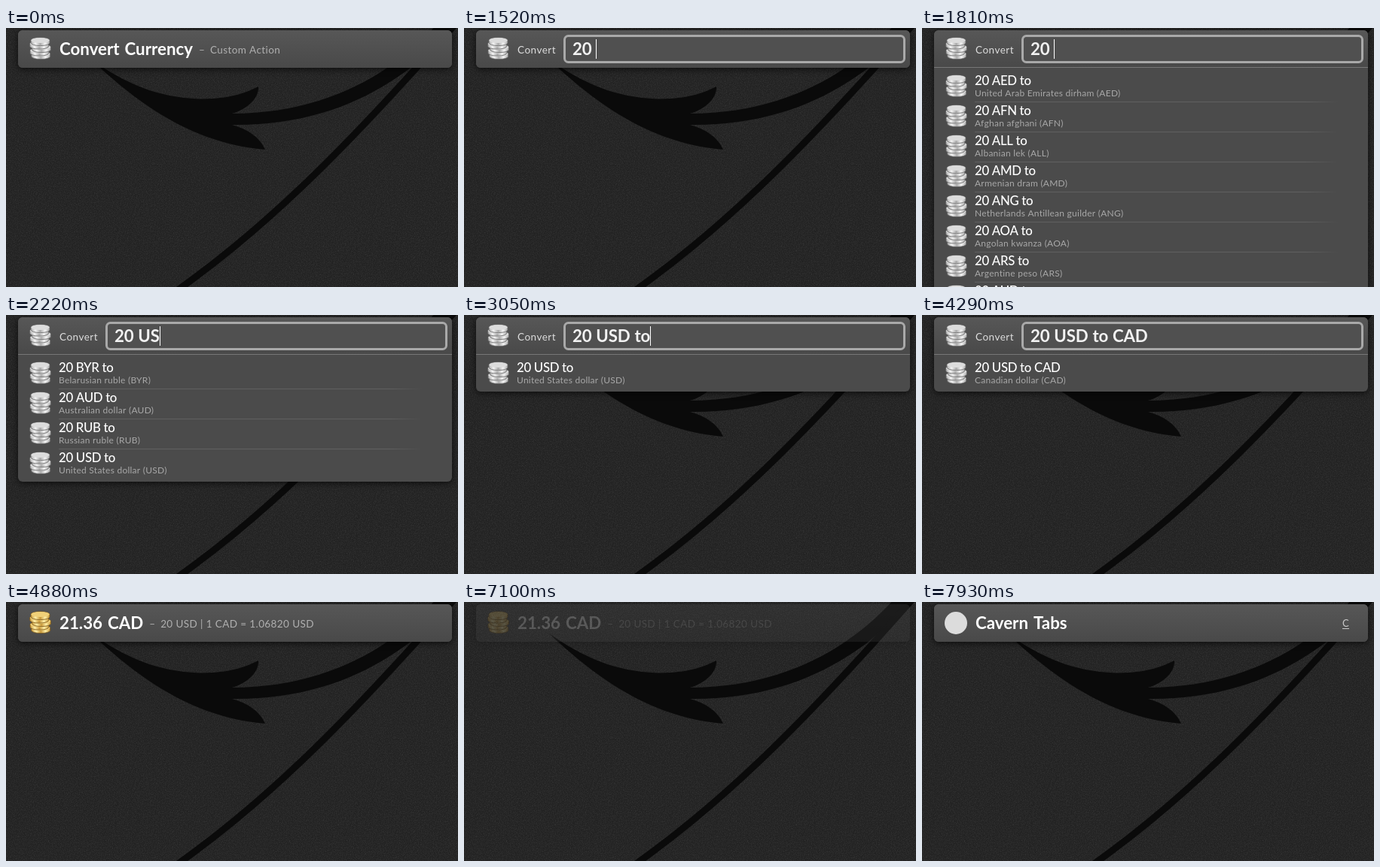
An HTML page with a canvas that plays this animation: 600x345 px, repeating every 7.99 s.

```html
<!DOCTYPE html>
<html lang="en">
<head>
<meta charset="utf-8">
<title>Currency conversion</title>
<style>
html, body { margin: 0; width: 100%; height: 100%; overflow: hidden; background: #272727; }
svg, canvas { position: absolute; left: 0; top: 0; width: 600px; height: 345px; }
</style>
</head>
<body>
<svg viewBox="0 0 600 345">
  <filter id="grain" x="0" y="0" width="100%" height="100%">
    <feTurbulence type="fractalNoise" baseFrequency="0.8" numOctaves="2" seed="4"/>
    <feColorMatrix values="0 0 0 0 1  0 0 0 0 1  0 0 0 0 1  .16 0 0 0 -.06"/>
  </filter>
  <rect width="600" height="345" fill="#222"/>
  <rect width="600" height="345" filter="url(#grain)"/>
  <path fill="#0a0a0a" d="M113 42C160 75 205 94 262 94.500C295 94 315 88 335 78C336 92 323 107 300 114C385 114 455 88 506 53C535 33 553 16 570 -3H600L537 53C475 100 400 130 300 129C322 135 338 147 344 162C270 155 200 125 113 42Z"/>
  <path fill="none" stroke="#0a0a0a" stroke-width="9" d="M228 349C350 262 450 158 543 55L600 -9"/>
</svg>
<canvas id="panel" width="600" height="345"></canvas>
<script>
const LOOP = 7990;
const canvas = document.getElementById('panel');
const ctx = canvas.getContext('2d');

const NAMES = {
  AED: 'United Arab Emirates dirham', AFN: 'Afghan afghani', ALL: 'Albanian lek',
  AMD: 'Armenian dram', ANG: 'Netherlands Antillean guilder', AOA: 'Angolan kwanza',
  ARS: 'Argentine peso', AUD: 'Australian dollar',
  BYR: 'Belarusian ruble', RUB: 'Russian ruble', USD: 'United States dollar',
  EUR: 'Euro', CUP: 'Cuban peso', UAH: 'Ukrainian hryvnia', UYU: 'Uruguayan peso',
  NIO: 'Nicaraguan cordoba', XAF: 'Central African CFA franc', XCD: 'East Caribbean dollar',
  KYD: 'Cayman Islands dollar', MOP: 'Macanese pataca', CRC: 'Costa Rican colon',
  MAD: 'Moroccan dirham', MXN: 'Mexican peso', CAD: 'Canadian dollar'
};
const ALL = 'AED AFN ALL AMD ANG AOA ARS AUD';
const WITH_U = 'BYR AUD RUB USD EUR CUP UAH UYU';
const WITH_C = 'XAF XCD NIO KYD MOP CRC MAD MXN';
const WITH_CA = 'NIO XAF XCD KYD MOP CRC MAD MXN';

const input = (query, codes = '', caret = true) => () => {
  const rows = codes ? codes.split(' ') : [];
  drawBar(rows.length);
  drawInput(query, caret);
  drawRows(rows, query);
};
const title = (name, note, icon) => () => {
  drawBar(0);
  icon();
  drawTitle(name, note);
};
const converted = title('21.36 CAD', '20 USD | 1 CAD = 1.06820 USD', () => drawCoins(0, true));
const blank = () => drawBar(0);

// start time, scene, opacity
const SCENES = [
  [0, title('Convert Currency', 'Custom Action', () => drawCoins(0))],
  [500, input('')],
  [1100, input('2')],
  [1340, input('20')],
  [1520, input('20 ')],
  [1580, input('20 ', ALL)],
  [1860, input('20 U', ALL)],
  [1920, input('20 U', WITH_U)],
  [2220, input('20 US', 'BYR AUD RUB USD')],
  [2400, input('20 USD', 'USD')],
  [2820, input('20 USD ', 'USD')],
  [2880, input('20 USD t', 'USD')],
  [2990, input('20 USD to', 'USD')],
  [3230, input('20 USD to ', ALL)],
  [3400, input('20 USD to C', ALL)],
  [3460, input('20 USD to C', WITH_C)],
  [3630, input('20 USD to CA', WITH_C)],
  [3690, input('20 USD to CA', WITH_CA)],
  [3750, input('20 USD to CAD', 'CAD')],
  [4290, input('20 USD to CAD', 'CAD', false)],
  [4830, () => {
    ctx.globalAlpha = 0.4;
    drawBar(1);
    drawRows(['CAD'], '20 USD to CAD');
    ctx.globalAlpha = 1;
    converted();
  }],
  [4880, converted],
  [7100, converted, 0.23],
  [7160, blank, 0],
  [7580, blank, 0.5],
  [7630, blank],
  [7930, () => {
    title('Cavern Tabs', '', drawDisc)();
    text('C', 558, 33, 13, 400, '#c8c8c8');
    ctx.fillRect(558, 35, 9, 1);
  }]
];

// Draws text and returns its width.
function text(str, x, y, size, weight, color, spacing = 0, words = 0) {
  ctx.font = `${weight} ${size}px Lato, "Open Sans", sans-serif`;
  ctx.letterSpacing = spacing + 'px';
  ctx.wordSpacing = words + 'px';
  ctx.fillStyle = color;
  ctx.fillText(str, x, y);
  return ctx.measureText(str).width;
}

function gradient(x1, y1, x2, y2, ...colors) {
  const g = ctx.createLinearGradient(x1, y1, x2, y2);
  colors.forEach((c, i) => g.addColorStop(i / (colors.length - 1), c));
  return g;
}

function box(x, y, w, h, r, fill) {
  ctx.beginPath();
  ctx.roundRect(x, y, w, h, r);
  ctx.fillStyle = fill;
  ctx.fill();
}

function drawBar(rows) {
  const height = rows ? 59 + rows * 40 : 50;
  ctx.save();
  ctx.shadowColor = 'rgba(0,0,0,.65)';
  ctx.shadowBlur = 9;
  ctx.shadowOffsetY = 2;
  box(16, 3, 576, height, 6, '#4b4b4b');
  ctx.restore();
  box(16, 3, 576, 50, rows ? [6, 6, 0, 0] : 6, gradient(0, 3, 0, 53, '#575757', '#505050', '#494949'));
  if (rows) {
    ctx.fillStyle = '#777';
    ctx.fillRect(16, 52, 576, 1);
  }
}

function drawTitle(name, note) {
  const w = text(name, 71, 36, 22.3, 700, '#fff', 0, 1.5);
  if (!note) return;
  const x = 71 + w;
  text('–', x + 8, 34, 13.5, 400, '#b0b0b0');
  text(note, x + 23, 34, 13.5, 400, '#b0b0b0', 0.4);
}

function drawInput(query, caret) {
  drawCoins(0);
  text('Convert', 71, 34, 13.5, 400, '#dcdcdc', 0.5);
  box(133.500, 10.500, 451, 35, 5, '#505050');
  ctx.strokeStyle = '#a9a9a9';
  ctx.lineWidth = 3;
  ctx.stroke();
  const w = text(query, 144, 36, 22.3, 700, '#f2f2f2', -0.15, 0.5);
  if (caret) {
    ctx.fillStyle = '#fff';
    ctx.fillRect(Math.round(144 + w), 15, 1, 26);
  }
}

function drawRows(codes, query) {
  const hasTarget = query.startsWith('20 USD to ');
  codes.forEach((code, i) => {
    const y = 40 * i;
    drawCoins(y + 50);
    const label = hasTarget ? `20 USD to ${code}` : `20 ${code} to`;
    text(label, 70, y + 75.7, 16.8, 500, '#fff', -0.3);
    text(`${NAMES[code]} (${code})`, 70, y + 91, 12, 400, '#a8a8a8', 0.25);
    if (i < codes.length - 1) {
      ctx.fillStyle = gradient(510, 0, 552, 0, '#606060', '#4b4b4b');
      ctx.fillRect(70, y + 98, 482, 1);
    }
  });
}

function drawCoins(top, gold) {
  const [dark, mid, light, face] = gold
    ? ['#7a581c', '#c8983a', '#fff0a8', '#f0d078']
    : ['#666', '#aaa', '#f4f4f4', '#dcdcdc'];
  const shifts = [1.2, -0.5, 2, -0.8, 0.5];
  shifts.forEach((dx, i) => {
    const x = 45 + dx, y = top + 34.5 - i * 4.5, rx = 12.5;
    ctx.beginPath();
    ctx.ellipse(x, y + 3.3, rx, 3.8, 0, 0, Math.PI);
    ctx.ellipse(x, y, rx, 3.8, 0, Math.PI, 0);
    ctx.closePath();
    ctx.fillStyle = gradient(x - rx, 0, x + rx, 0, mid, light, mid, light, mid);
    ctx.fill();
    ctx.lineWidth = 0.8;
    ctx.strokeStyle = dark;
    ctx.stroke();
    ctx.beginPath();
    ctx.ellipse(x, y, rx - 0.4, 3.5, 0, 0, 7);
    ctx.fillStyle = face;
    ctx.fill();
  });
}

function drawDisc() {
  ctx.beginPath();
  ctx.arc(45, 28, 15, 0, 7);
  ctx.fillStyle = '#dcdcdc';
  ctx.fill();
}

function frame(now) {
  const t = now % LOOP;
  const [, draw, opacity = 1] = SCENES.findLast(s => s[0] <= t);
  ctx.clearRect(0, 0, 600, 345);
  draw();
  canvas.style.opacity = opacity;
  requestAnimationFrame(frame);
}
frame(0);
</script>
</body>
</html>
```
